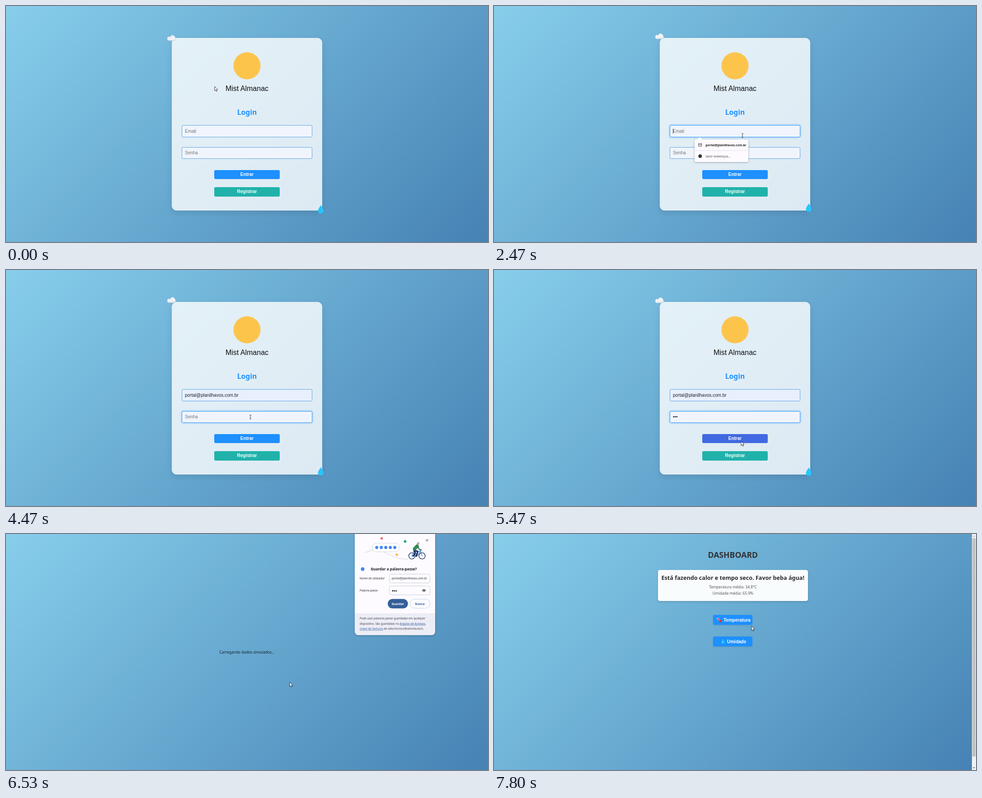
An HTML page for the animation above (8 s loop, 1067 by 525 pixels).

```html
<!DOCTYPE html>
<html lang="pt">
<head>
<meta charset="utf-8">
<title>Login</title>
<style>
  html, body { margin: 0; width: 100%; height: 100%; overflow: hidden; }
  #sky { position: absolute; inset: 0; background: linear-gradient(135deg, #87ceeb, #4682b4); }
  .layer, .layer > svg { position: absolute; left: 0; top: 0; width: 1067px; height: 525px; }
  .layer > svg { overflow: visible; }
  .box { position: absolute; box-sizing: border-box; }
  .card { left: 367px; top: 71px; width: 333px; height: 383.5px; border-radius: 11px;
    background: rgba(255,255,255,.8); box-shadow: 0 5px 14px rgba(0,0,0,.1); }
  .field { left: 388.7px; width: 289.6px; height: 26.6px; border: 1px solid #5ba3de;
    border-radius: 3px; background: #f0f5fd; }
  .field.filled { background: #e8f0fe; }
  .field.focus { border-color: #3b9bf5; box-shadow: 0 0 4px rgba(30,144,255,.6); }
  .button { border-radius: 3px; background: #1e90ff; }
  .wide { left: 461px; width: 145px; height: 20.5px; }
  .tile { left: 485px; width: 87px; height: 22.2px; box-shadow: 0 1px 3px rgba(0,0,0,.12); }
  .summary { left: 363px; top: 79.5px; width: 332px; height: 69px; border-radius: 4.5px;
    background: rgba(255,255,255,.96); box-shadow: 0 2px 5px rgba(0,0,0,.14); }
  .menu { left: 444px; top: 296.5px; width: 119px; height: 50px; border-radius: 3.5px;
    background: #fdfbff; box-shadow: 0 1px 4px rgba(0,0,0,.3); }
  .dialog { left: 771.5px; top: -8px; width: 178.5px; height: 233px; border-radius: 8px;
    background: linear-gradient(#fdfbff 185px, #ededf6 185px); box-shadow: 0 1px 4px rgba(0,0,0,.25); }
  text { font-family: "Noto Sans", "Open Sans", sans-serif; fill: #222; }
  .arial { font-family: "Liberation Sans", Arial, sans-serif; font-size: 10px; }
  .label { font-weight: bold; fill: #fff; }
  .hint { fill: #757575; }
  .mid { text-anchor: middle; }
  .small { font-size: 6.2px; fill: #303036; }
  .semi { font-weight: 600; }
</style>
</head>
<body>
<div id="sky"></div>

<div class="layer" id="login">
  <div class="box card"></div>
  <div class="box field" id="emailField" style="top:265.2px"></div>
  <div class="box field" id="passField" style="top:313.6px"></div>
  <div class="box button wide" id="enter" style="top:364.5px"></div>
  <div class="box button wide" style="top:403px;background:#20b2aa"></div>
  <svg>
    <g id="cloud">
      <g fill="#c9cdd8" transform="translate(0 .7)">
        <circle cx="-5" cy="1.6" r="4.1"/><circle cx="2.7" cy="-.9" r="5.3"/><circle cx="5.5" cy="1.4" r="4"/><rect x="-6" y="0" width="11" height="5.7"/>
      </g>
      <g fill="#f0f0f5">
        <circle cx="-5" cy="1.4" r="4"/><circle cx="2.7" cy="-.9" r="5.1"/><circle cx="5.4" cy="1.2" r="3.8"/><rect x="-6" y="0" width="11" height="5.2"/>
      </g>
    </g>
    <path id="drop" fill="#29c4fa" d="M0-9.2C2.5-5 6.2-.5 6.2 3A6.2 6.2 0 0 1-6.2 3C-6.2-.5-2.5-5 0-9.2Z"/>
    <circle cx="533.5" cy="133" r="30" fill="#fdc44c"/>
    <text class="arial mid" x="533.5" y="188.7" style="font-size:16px;fill:#0c0c0c">Mist Almanac</text>
    <text class="mid" x="533.5" y="242" font-size="15.7" font-weight="bold" style="fill:#1e90ff">Login</text>
    <text class="arial" id="emailText" x="396" y="282"></text>
    <text class="arial" id="passText" x="396" y="330.2"></text>
    <path id="caret" stroke="#222" stroke-width=".8"/>
    <text class="arial label mid" x="533.5" y="378">Entrar</text>
    <text class="arial label mid" x="533.5" y="416.4">Registrar</text>
  </svg>
</div>

<div class="layer" id="menu">
  <div class="box menu"></div>
  <svg>
    <path d="M450 297L455.5 291.5 461 297Z" fill="#fdfbff"/>
    <rect id="menuHover" x="444" y="298" width="119" height="23" fill="#ecebf2"/>
    <path d="M444 321.5H563" stroke="#e2e0e8"/>
    <path d="M452.8 306.3h7v5.6h-7zL456.3 309.4 459.8 306.3" fill="none" stroke="#333" stroke-width=".9"/>
    <circle cx="456.3" cy="334" r="3.9" fill="#333"/>
    <text class="semi" x="468.3" y="311.8" font-size="6.7">portal@planilhavos.com.br</text>
    <text x="468.3" y="336.6" font-size="6.7" style="fill:#444">Gerir endereços...</text>
  </svg>
</div>

<div class="layer" id="loading">
  <svg><text class="mid" x="533.5" y="266" font-size="8.4" style="fill:#152028">Carregando dados simulados...</text></svg>
</div>

<div class="layer" id="dashboard">
  <div class="box summary"></div>
  <div class="box button tile" style="top:179.6px"></div>
  <div class="box button tile" style="top:227.8px"></div>
  <svg>
    <g class="mid">
      <text x="528.8" y="52.5" font-size="17.7" font-weight="bold" style="fill:#333">DASHBOARD</text>
      <text x="528.8" y="102" font-size="12.65" font-weight="bold" style="fill:#2c2c2c">Está fazendo calor e tempo seco. Favor beba água!</text>
      <text x="528.8" y="120.7" font-size="8.25" style="fill:#555">Temperatura média: 34.8°C</text>
      <text x="528.8" y="135" font-size="8.35" style="fill:#555">Umidade média: 65.9%</text>
    </g>
    <text class="arial label" x="508" y="194.5">Temperatura</text>
    <text class="arial label" x="516" y="242.8">Umidade</text>
    <g stroke-linecap="round">
      <path d="M495 187.8L501 193.8" stroke="#dfe5ee" stroke-width="3.6"/>
      <circle cx="501" cy="193.6" r="2.6" fill="#dd2e44"/>
      <path d="M495.2 188L501 193.8" stroke="#dd2e44" stroke-width="1.9"/>
    </g>
    <path fill="#29c4fa" transform="translate(506.8 239) scale(.55)" d="M0-9.2C2.5-5 6.2-.5 6.2 3A6.2 6.2 0 0 1-6.2 3C-6.2-.5-2.5-5 0-9.2Z"/>
    <rect x="1058" width="9" height="525" fill="#f1f1f1"/>
    <rect x="1059" y="9.5" width="7" height="485.5" fill="#c1c1c1"/>
    <path d="M1060.2 6L1062.5 3.5 1064.8 6Z" fill="#a3a3a3"/>
    <path d="M1060.2 519L1062.5 521.5 1064.8 519Z" fill="#505050"/>
  </svg>
</div>

<div class="layer" id="dialog">
  <div class="box dialog"></div>
  <svg>
    <path d="M795 42C812 32 828 36 843 43S872 57 889 56" fill="none" stroke="#dadce4" stroke-width="1.3"/>
    <rect x="811.3" y="20.5" width="59" height="19" rx="7.5" fill="#fff" stroke="#d5d8e2"/>
    <path d="M820.7 30H861" stroke="#4285f4" stroke-width="6.8" stroke-linecap="round" stroke-dasharray="0 10"/>
    <path d="M827.6 10.8L833 6 834.4 12.6Z" fill="#ea5b5b"/>
    <circle cx="883.5" cy="16.5" r="3" fill="#34a67a"/>
    <rect x="862.5" y="43.5" width="5.2" height="5.2" rx=".6" fill="#fbbc4d" transform="rotate(18 865 46)"/>
    <g fill="none" stroke-linejoin="round" stroke-linecap="round">
      <g stroke="#1c2f57" stroke-width="1.4"><circle cx="898.6" cy="48.6" r="7"/><circle cx="921" cy="48.6" r="7"/></g>
      <path d="M898.6 48.6L903 38.5 910 49H898.6M903 38.5H917.5L910 49M921 48.6L916.5 35.5H920" stroke="#4285f4" stroke-width="1.4"/>
      <path d="M904 36L911.5 39 908 49.5M903 36L906 42 901.5 49" stroke="#1c2f57" stroke-width="3.2"/>
      <path d="M904.5 33L910 27" stroke="#34895c" stroke-width="7.5"/>
      <path d="M911.5 27L914.5 33.5 919 35.5" stroke="#2d7a52" stroke-width="2.4"/>
    </g>
    <circle cx="912.2" cy="21.6" r="2.6" fill="#e0a190"/>
    <path d="M909 21.2A3.4 3.4 0 0 1 915.5 20.2Z" fill="#a9adb8"/>
    <path d="M929.5 11.5l5 5m0-5l-5 5" stroke="#444" stroke-width="1"/>
    <circle cx="789.5" cy="78" r="4" fill="#4285f4"/>
    <text class="semi" x="807.4" y="80.8" font-size="8.1" style="fill:#1c1c22">Guardar a palavra-passe?</text>
    <text class="small" x="783" y="101.3">Nome de utilizador</text>
    <text class="small" x="783" y="127.7">Palavra-passe</text>
    <g fill="none" stroke="#c6c8d4" stroke-width=".9">
      <rect x="848.5" y="89.2" width="90" height="19.6" rx="4"/>
      <rect x="848.5" y="115.6" width="90" height="19.8" rx="4"/>
    </g>
    <text class="small" x="854" y="101.3">portal@planilhavos.com.br</text>
    <text class="arial" x="854" y="129.5" style="font-size:11px">•••</text>
    <path d="M921 125.5Q925.2 119.7 929.4 125.5 925.2 131.3 921 125.5Z" fill="#333"/>
    <circle cx="925.2" cy="125.5" r="1.6" fill="#333" stroke="#fdfbff" stroke-width=".9"/>
    <rect x="845" y="144.5" width="44.8" height="21" rx="10.5" fill="#345f99"/>
    <rect x="894.3" y="144.9" width="44.2" height="20.2" rx="10.1" fill="none" stroke="#b9cfea" stroke-width=".9"/>
    <text class="semi mid" x="867.4" y="157.5" font-size="6.6" style="fill:#fff">Guardar</text>
    <text class="semi mid" x="916" y="157.5" font-size="6.6" style="fill:#345f99">Nunca</text>
    <path d="M772 177H950" stroke="#e3e3ec" stroke-width=".7"/>
    <g class="small">
      <text x="783" y="190.4" style="fill:#45464f">Pode usar palavras-passe guardadas em qualquer</text>
      <text x="783" y="201.7" style="fill:#45464f">dispositivo. São guardadas no <tspan fill="#345f99" style="fill:#345f99;text-decoration:underline">Arquivo de Acessos-</tspan></text>
      <text x="783" y="212.9" style="fill:#45464f"><tspan style="fill:#345f99;text-decoration:underline">chave da Vomuno</tspan> de setor.tecnico@velnofa.tech.</text>
    </g>
  </svg>
</div>

<div class="layer">
  <svg>
    <path id="arrow" d="M0 0V9.6L2.2 7.6 3.7 10.9 5.3 10.2 3.9 7H6.8Z" fill="#fff" stroke="#111" stroke-width=".8"/>
    <path id="beam" d="M-2-4.2H-.5L0-3.8 .5-4.2H2M0-3.8V3.8M-2 4.2H-.5L0 3.8 .5 4.2H2" fill="none" stroke="#222" stroke-width=".9"/>
  </svg>
</div>

<script>
const LOOP = 8000;
const EMAIL = "portal@planilhavos.com.br";
const EMAIL_CLICK = 1400, PICK = 3250, PASS_CLICK = 3900;
const KEYS = [4650, 4800, 4950];
const SUBMIT = 5600, DIALOG_IN = 5670, DATA_READY = 6600, DIALOG_OUT = 7530;

// Pointer stops: time, x, y
const POINTER = [
  [300, 462, 179], [1300, 548, 284], [1800, 550, 288], [2600, 550, 288],
  [3150, 512, 308], [3300, 512, 308], [3850, 541, 327], [5000, 541, 327],
  [5350, 547, 381], [6300, 547, 381], [7050, 905, 154], [7200, 911, 150],
  [7500, 911, 150], [7780, 570, 205]
];

const $ = id => document.getElementById(id);
const show = (id, on) => { $(id).style.display = on ? "" : "none"; };
const move = (id, x, y) => $(id).setAttribute("transform", `translate(${x} ${y})`);
const smooth = u => u * u * (3 - 2 * u);

function pointerAt(t) {
  const next = POINTER.findIndex(stop => stop[0] > t);
  if (next === 0) return POINTER[0].slice(1);
  if (next < 0) return POINTER.at(-1).slice(1);
  const [t0, x0, y0] = POINTER[next - 1], [t1, x1, y1] = POINTER[next];
  const u = smooth((t - t0) / (t1 - t0));
  return [x0 + (x1 - x0) * u, y0 + (y1 - y0) * u];
}

// Solves the CSS ease-in-out curve for progress x
function easeInOut(x) {
  let lo = 0, hi = 1;
  for (let i = 0; i < 14; i++) {
    const s = (lo + hi) / 2;
    const bx = 1.26 * s * (1 - s) ** 2 + 1.74 * s * s * (1 - s) + s ** 3;
    if (bx < x) lo = s; else hi = s;
  }
  return smooth(lo);
}

function floatOffset(t) {
  const phase = ((t - 420 + 3000) % 3000) / 1500;
  return -6.67 * easeInOut(phase < 1 ? phase : 2 - phase);
}

function setText(id, value, hint) {
  $(id).textContent = value || hint;
  $(id).classList.toggle("hint", !value);
}

function drawLogin(t, x, y) {
  const dy = floatOffset(t);
  move("cloud", 366, 72 + dy);
  move("drop", 696.8, 453.6 + dy);

  const typed = KEYS.filter(key => key <= t).length;
  const filled = t >= PICK;
  const onPass = t >= PASS_CLICK;
  const onEmail = t >= EMAIL_CLICK && !onPass;
  setText("emailText", filled ? EMAIL : "", "Email");
  setText("passText", "•".repeat(typed), "Senha");
  $("emailField").classList.toggle("filled", filled);
  $("emailField").classList.toggle("focus", onEmail);
  $("passField").classList.toggle("focus", onPass);
  $("enter").style.background = y > 364 && y < 385 ? "#4169e1" : "";

  const since = t - (onPass ? Math.max(PASS_CLICK, ...KEYS.slice(0, typed)) : filled ? PICK : EMAIL_CLICK);
  show("caret", (onEmail || onPass) && since % 1000 < 500);
  const caretX = onPass ? 396.5 + typed * 3.5 : filled ? 396.5 + $("emailText").getComputedTextLength() : 396.5;
  $("caret").setAttribute("d", `M${caretX} ${onPass ? 321.5 : 273}v11`);
}

function frame(now) {
  const t = now % LOOP;
  const [x, y] = pointerAt(t);
  const login = t < SUBMIT, menu = t >= EMAIL_CLICK + 100 && t < PICK, ready = t >= DATA_READY;
  show("login", login);
  show("menu", menu);
  show("menuHover", y > 298 && y < 321);
  show("loading", !login && !ready);
  show("dashboard", ready);
  show("dialog", t >= DIALOG_IN && t < DIALOG_OUT);
  $("sky").style.right = ready ? "9px" : "0";
  if (login) drawLogin(t, x, y);

  const overField = login && (y > 265 && y < 292 || !menu && y > 314 && y < 340);
  show("beam", overField);
  show("arrow", !overField);
  move(overField ? "beam" : "arrow", x, y);
  requestAnimationFrame(frame);
}
requestAnimationFrame(frame);
</script>
</body>
</html>
```
